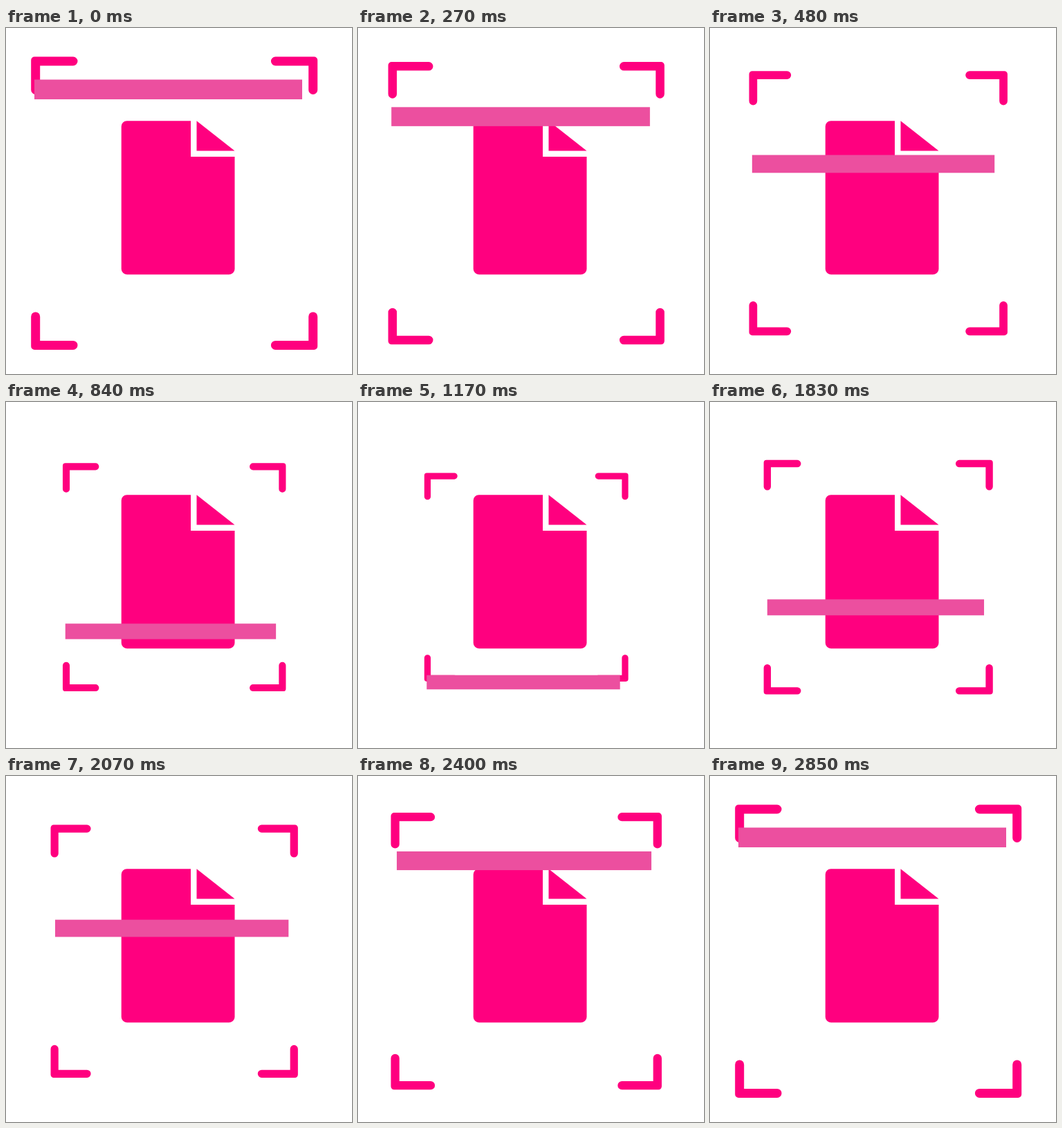
These frames come from a looping animation (500x500 px, 2970 ms). An HTML page with a canvas:

```html
<!DOCTYPE html>
<html lang="en">
<head>
<meta charset="utf-8">
<title>Document scan</title>
<style>
  html, body { margin: 0; width: 100%; height: 100%; overflow: hidden; background: #fff; }
  canvas { display: block; width: 500px; height: 500px; }
</style>
</head>
<body>
<canvas id="stage" width="500" height="500"></canvas>
<script>
const ctx = document.getElementById('stage').getContext('2d');
const PINK = '#ff007f';
const BAR = '#ec4f9f';
const LOOP = 2970, STEP = 30, REST = 2850, TURN = 1230, BAR_END = 2810;

const lerp = (a, b, k) => a + (b - a) * k;

// Eased progress of t between two times
function ease(t, from, to) {
  const u = Math.min(1, Math.max(0, (t - from) / (to - from)));
  return u * u * (3 - 2 * u);
}

// Three-key track: start, turning point, end
function track(t, [a, b, c], end) {
  return t < TURN ? lerp(a, b, ease(t, 0, TURN)) : lerp(b, c, ease(t, TURN, end));
}

function drawPage() {
  ctx.fillStyle = PINK;
  ctx.beginPath();
  ctx.moveTo(267, 134.2);
  ctx.lineTo(267, 186);
  ctx.lineTo(330.5, 186);
  ctx.arcTo(330.5, 356.2, 300, 356.2, 8);
  ctx.arcTo(166.7, 356.2, 166.7, 300, 8);
  ctx.arcTo(166.7, 134.2, 200, 134.2, 8);
  ctx.closePath();
  ctx.moveTo(275.5, 134.2);
  ctx.lineTo(330.5, 177.5);
  ctx.lineTo(275.5, 177.5);
  ctx.closePath();
  ctx.fill();
}

function drawCorners(scale) {
  ctx.fillStyle = PINK;
  for (const sx of [-1, 1]) {
    for (const sy of [-1, 1]) {
      ctx.save();
      ctx.translate(243.2, 253.2);
      ctx.scale(scale * sx, scale * sy);
      ctx.beginPath();
      ctx.roundRect(-207, -211.7, 67.3, 13, [5, 6.5, 6.5, 0]);
      ctx.roundRect(-207, -211.7, 13, 54.5, [5, 0, 6.5, 6.5]);
      ctx.fill();
      ctx.restore();
    }
  }
}

function drawBar(t) {
  const x = track(t, [234.5, 239, 240.2], BAR_END);
  const y = track(t, [88.8, 407.2, 65.4], BAR_END);
  const s = track(t, [1, 0.72, 0.997], BAR_END);
  const w = 387 * s, h = 28.5 * s;
  ctx.fillStyle = BAR;
  ctx.fillRect(x - w / 2, y - h / 2, w, h);
}

function frame() {
  let t = Math.floor((performance.now() % LOOP) / STEP) * STEP;
  if (t >= REST) t = 0;
  ctx.fillStyle = '#fff';
  ctx.fillRect(0, 0, 500, 500);
  drawPage();
  drawCorners(track(t, [1, 0.71, 1], REST));
  drawBar(t);
  requestAnimationFrame(frame);
}
frame();
</script>
</body>
</html>
```
